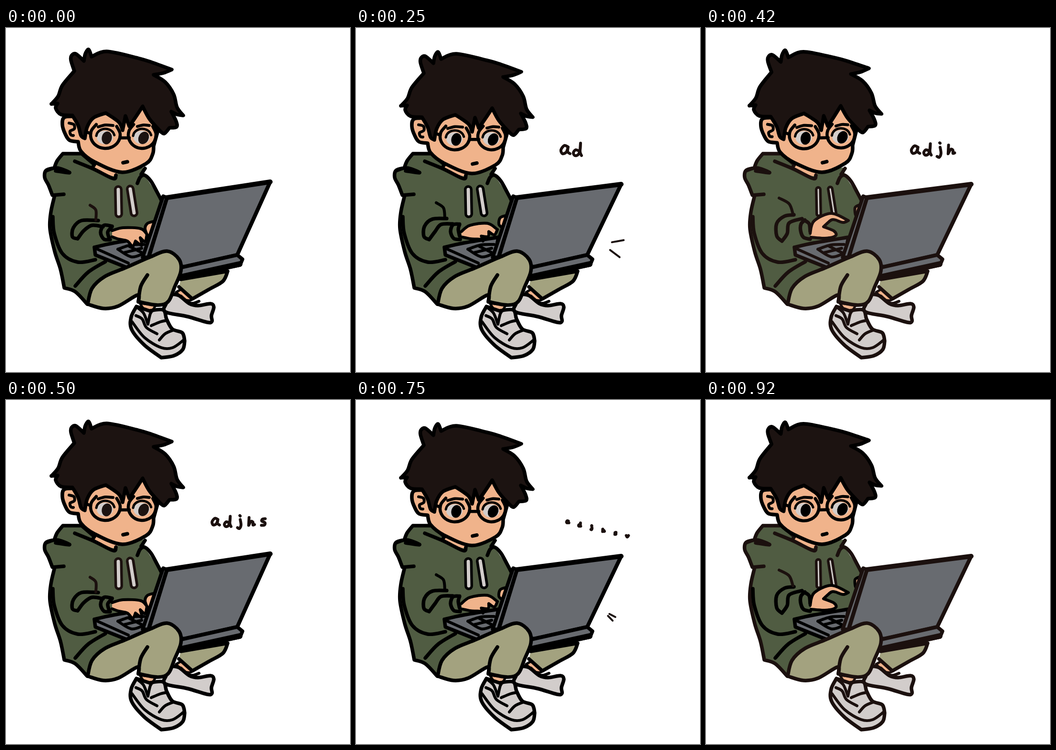
An HTML page for the animation above (1010 ms loop, 720 px wide and 720 px high).

```html
<!DOCTYPE html>
<html lang="en">
<head>
<meta charset="utf-8">
<title>Typing on a laptop</title>
<style>
html, body { margin: 0; width: 100%; height: 100%; overflow: hidden; background: #fff; }
svg { display: block; width: 100%; height: 100%; }
path { stroke-linecap: round; stroke-linejoin: round; }
</style>
</head>
<body>
<svg id="stage" viewBox="0 0 720 720" role="img" aria-label="adjhsv"></svg>
<script>
const BLACK = '#000', BROWN = '#1b100e', HAIR = '#1c1311', SKIN = '#f0b38b',
  GREEN = '#505c42', PANTS = '#a3a27f', GREY = '#686b70', SHOE = '#d2cdcb';
const LOOP = 1010;

// Smooth curve through points; "/" marks a corner, "|" starts a new stroke.
const curve = text => text.split('|').map(stroke => {
  let d = '', last;
  for (const part of stroke.split('/')) {
    const pts = part.trim().split(' ').map(p => p.split(',').map(Number));
    if (last) pts.unshift(last); else d = 'M' + pts[0];
    for (let i = 0; i < pts.length - 1; i++) {
      const a = pts[i - 1] || pts[i], b = pts[i], c = pts[i + 1], e = pts[i + 2] || c;
      const h1 = b.map((v, k) => v + (c[k] - a[k]) / 6);
      const h2 = c.map((v, k) => v - (e[k] - b[k]) / 6);
      d += `C${h1} ${h2} ${c}`;
    }
    last = pts[pts.length - 1];
  }
  return d;
}).join('');

const draw = (text, fill = 'none', ink = 'none', width = 7.5) =>
  `<path d="${curve(text)}" fill="${fill}" stroke="${ink}" stroke-width="${width}"/>`;
const line = (text, ink, width) => draw(text, 'none', ink, width);
const oval = (x, y, rx, ry, fill, turn = 0) =>
  `<ellipse cx="${x}" cy="${y}" rx="${rx}" ry="${ry}" fill="${fill}" transform="rotate(${turn} ${x} ${y})"/>`;
const polar = (x, y, rx, ry, deg) => {
  const a = deg * Math.PI / 180;
  return `${x + rx * Math.cos(a)},${y + ry * Math.sin(a)}`;
};
const arc = (x, y, rx, ry, from, to, width) =>
  line(Array.from({ length: 9 }, (_, i) => polar(x, y, rx, ry, from + (to - from) * i / 8)).join(' '), BLACK, width);

// Every number in a path moves from its low value to its high value.
const mix = (low, high, t) => {
  const goal = high.match(/[\d.]+/g);
  let i = 0;
  return low.replace(/[\d.]+/g, n => +n + (goal[i++] - n) * t);
};

const eye = (x, y, lens, pupil, tilt) =>
  oval(x, y + 5, 17, 14, SHOE) + oval(x + 4, y + 6, 10.5, 13.5, pupil, tilt) +
  arc(x + 1, y + 3, 19, 16, 185, 350, 5) +
  arc(x + 1, y, lens, 28, 232, -40, 6.5);

const head = (move, pupil) => `<g transform="${move}">` +
  draw('146,185 122,187 118,203 124,222 133,235 151,238/157,258 185,280 243,302 293,284 307,264 309,247/318,215/286,150 146,185', SKIN, BLACK) +
  line('132,199 142,202 143,211 134,216 136,224 141,225', BLACK, 6) +
  eye(207, 224, 31, pupil, 12) + eye(284, 224, 29, pupil, 28) +
  line('193,207 208,203 224,204|275,206 288,203 300,204', BLACK, 6) +
  line('240,230 258,230|160,214 177,221', BLACK, 6.5) +
  line('245,282 254,280', BLACK) +
  draw('95,159 109,143 118,120 143,90/136,68 137,58 146,54 163,69/166,54 173,45 179,60/211,49 276,63/300,70 347,87/330,94 309,98/333,113 351,139 358,166 371,183/358,181 346,175/356,195 357,207 342,209/331,221 321,214/300,190 286,164/273,184 258,206/250,184/244,214/236,197 209,178/183,188 170,207 165,231/157,225 151,204 139,183/115,181 104,168 108,158/95,159', HAIR, BLACK) +
  '</g>';

const hood = '121,348 97,350/89,329 81,313 84,298 101,293/107,278 119,263/156,263';
const back = '102,350 94,385 92,420 102,468 114,505 122,544/145,552 170,578';
const shoulder = '291,294 283,306|275,325 281,312 290,308 303,320 316,343 326,362';

const torso = ink =>
  draw(back + '/252,500/300,480/326,362/290,308/290,292/243,296/157,258/150,330', GREEN) +
  draw(hood + '/243,300/150,345', GREEN) +
  draw('185,276 181,292/224,310 236,299', SKIN) +
  line([hood, back, shoulder].join('|'), ink) +
  line('86,298 101,293 116,295 133,303 104,299|144,279 183,295 224,315 230,308|157,262 185,286/181,292', ink);

const crease = '98,395 101,430 118,472 150,490 187,485|145,540 172,511 208,489';
const armPaths = {
  sleeve: [
    '150,441 139,437 141,418 158,403 193,403|150,441 163,424 180,413 203,416|222,415 205,413 198,428 205,442 218,443|222,416 213,427 216,440',
    '159,446 148,435 148,409 164,394 184,391|159,446 170,430 174,408 201,399|207,402 199,410 198,424 204,438 218,442|207,403 216,410 218,426'
  ],
  bend: ['176,371 188,381 188,402', '153,356 174,368 182,389'],
  hand: [
    '222,424 245,418 282,420 295,432/291,447 281,439/284,455 271,446/265,457 254,446 236,442 222,437',
    '218,430 226,404 262,388 298,403/287,407 272,402/262,402 246,416/268,425 271,435 249,440 220,438'
  ],
  far: ['308,405 296,409 291,420 297,437', '322,370 312,376 314,393 322,382']
};
const arm = (name, lift) => mix(...armPaths[name], lift);

const laptop = (ink, armInk, lift, hands) => {
  const shift = Math.min(1, lift * 3);
  const corner = `${553 + 2 * shift},${322 + 5 * shift}`, top = '337,355';
  return draw('185,459/225,450 298,438/288,490/252,501/187,475/185,459', GREY, armInk) +
    line('187,461 256,492|234,463 262,454 289,453|234,463 262,479 286,473|248,470 284,461|258,457 284,470', armInk, 6) +
    hands +
    draw(`329,352/${top}/298,480/286,480/329,352`, GREY, ink) +
    draw(`${top}/${corner}/484,475/372,500/298,482/${top}`, GREY, ink, 8) +
    line(`${top}/${corner}`, ink, 10) +
    draw('368,501/484,475/495,484/490,496/366,522', GREY, ink) +
    line('366,521 489,494', ink, 12);
};

const farLeg = ink =>
  draw('356,553 368,546/388,568 372,568 356,553', SKIN, ink, 5) +
  draw('366,526 464,509/454,530 425,547 390,567/362,542', PANTS, ink) +
  draw('345,557 362,560 384,577 402,581 428,577 435,584 430,602 431,614 421,616 380,604 333,594 335,577 345,557', SHOE, ink) +
  line('366,561 386,576 404,572', ink, 6);

const nearLeg = ink =>
  draw('280,576 314,580/298,598 280,576', SKIN, ink, 5) +
  draw('171,578 180,545 207,520 252,501 300,480 337,467 362,484 366,509 353,542 340,572 318,580 277,573/275,559 235,582 204,587 171,578', PANTS, ink) +
  line('277,573 282,541 296,517', ink) +
  draw('273,583 262,605 263,631 289,663 325,690/351,686 370,673 374,655/369,638 348,630 336,609 329,590 300,592/288,588 273,583', SHOE, ink) +
  line('264,615 290,648 325,669 349,669 372,653|272,602 285,609 294,627 316,640|275,585 288,597 297,620/302,598 308,590|304,623 323,615 336,612|321,653 333,640 351,632', ink, 6);

const poses = [
  { lift: 0, pupil: HAIR, detail: BROWN },
  { lift: 0 },
  { lift: .35, move: 'matrix(1 0 0 .99 -1 5.5)' },
  { lift: 1, move: 'rotate(-1.4 240 330)', ink: BROWN }
];

function figure({ lift, move = '', pupil = BLACK, ink = BLACK, detail = ink }, armInk) {
  const strap = lift < 1 ? 7 : 3;
  const hands = draw(arm('far', lift), SKIN, armInk, 6) + draw(arm('hand', lift), SKIN, armInk, 6);
  return farLeg(ink) + torso(ink) +
    line(crease + '|' + arm('sleeve', lift), armInk) +
    line(arm('bend', lift), detail, 6) +
    line('235,338 236,389|260,337 268,387', detail, strap + 11) +
    line('235,338 236,389|260,337 268,387', SHOE, strap) +
    laptop(ink, armInk, lift, hands) + nearLeg(ink) + head(move, pupil);
}

// Letters are strokes around their own centre.
const glyphs = {
  a: '6,-6 -2,-9 -9,0 -6,8 2,5 6,-6/5,4 10,8',
  d: '5,3 -3,0 -8,6 -5,12 2,10 6,0 7,-14/6,4 9,12',
  j: '2,-6 4,8 0,17 -5,15|1,-16 2,-15',
  h: '-6,-11 -7,9/-1,-1 4,1 4,8 8,7',
  s: '5,-8 -2,-7 -4,-2 4,2 3,8 -5,9',
  v: '-9,-5 -3,6 3,4 9,-5'
};

// The first letter rises, the rest join one per step, then all shrink and sag.
function letters(step) {
  if (step < 1 || step > 9) return '';
  const rise = Math.max(0, 3 - step) / 2;
  const fade = Math.max(0, step - 3) / 6;
  const sag = Math.max(0, step - 6.5) * 2.4;
  const size = 1 - .87 * rise - .74 * fade ** 2;
  return [...'adjhsv'].slice(0, Math.max(1, step - 1)).map((name, i) => {
    const path = glyphs[name].replace(/-?\d+/g, n => n * size);
    const x = 438 + 25 * i + 5 * fade ** 3, y = 255 + 61 * rise + sag * i;
    return `<g transform="translate(${x} ${y})">${line(path, BROWN, 6)}</g>`;
  }).join('');
}

const rays = (x, y, radius, length, ...angles) => angles.map(a =>
  line(polar(x, y, radius, radius, a) + ' ' + polar(x, y, radius + length, radius + length, a), BROWN, 4)).join('');
const sparks = {
  3: rays(515, 452, 21, 25, -10, 37),
  7: rays(513, 457, 31, 28, -40, -23, -4),
  9: rays(517, 441, 15, 14, 46, 27)
};

// Each 250 ms holds three drawings, for 80, 90 and 80 ms.
function stepAt(t) {
  const rest = t % 250;
  return Math.min(11, 3 * Math.floor(t / 250) + (rest >= 80) + (rest >= 170));
}

const stage = document.getElementById('stage');
let shown = -1;

function render(time) {
  const step = stepAt(time % LOOP);
  if (step === shown) return;
  shown = step;
  const pose = poses[Math.ceil(step % 6 / 2)];
  const armInk = step === 5 ? BROWN : BLACK;
  stage.innerHTML = figure(pose, armInk) + letters(step) + (sparks[step] || '');
}

const begin = performance.now();
function tick() {
  render(performance.now() - begin);
  requestAnimationFrame(tick);
}
tick();
</script>
</body>
</html>
```
